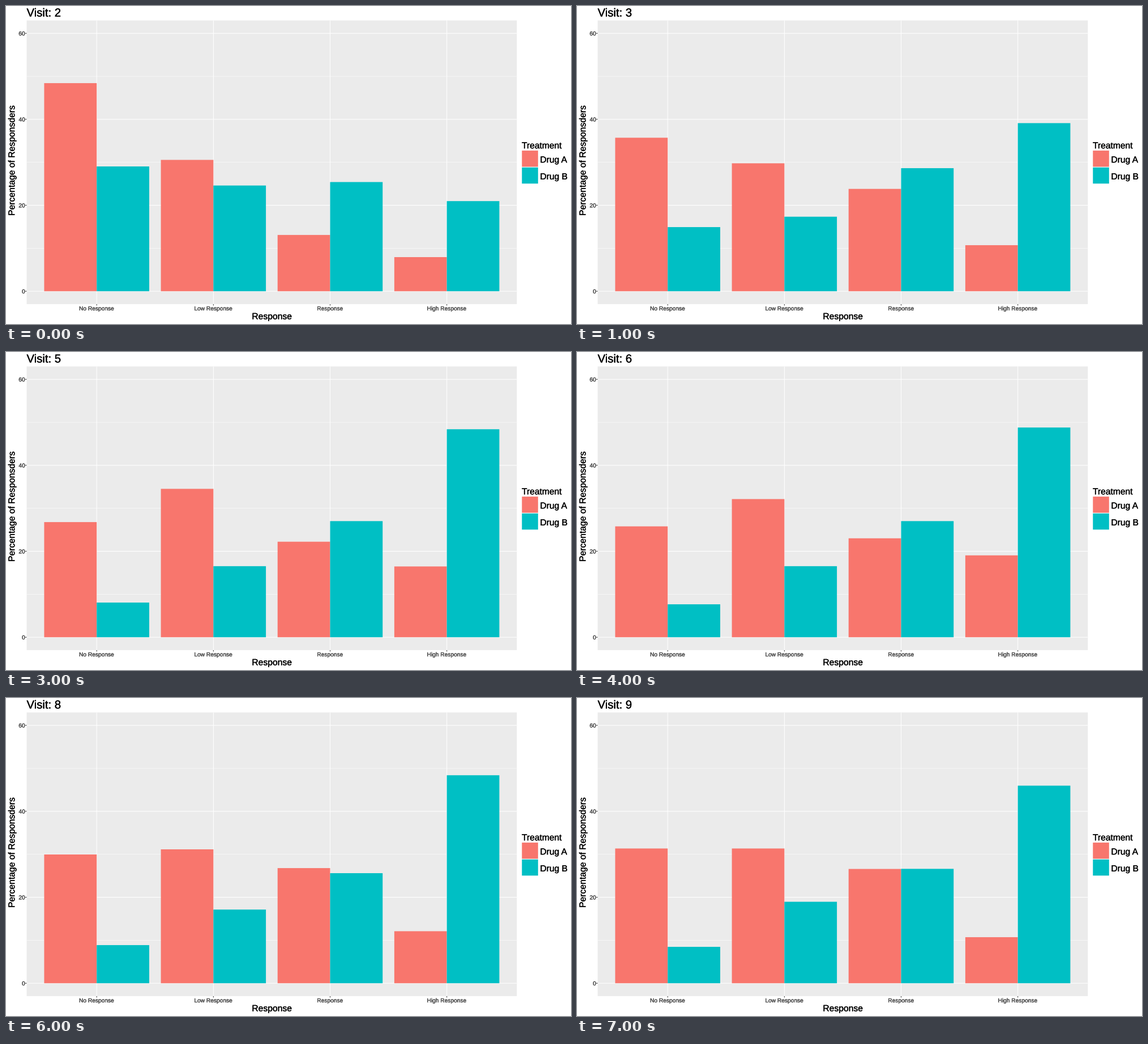
Recreate the animation shown at these times as a matplotlib script. Size 998 by 561 pixels, loop 8000 ms.

```python
import matplotlib.pyplot as plt
import numpy as np
from matplotlib.animation import FuncAnimation
from matplotlib.patches import Rectangle
from matplotlib.patheffects import withStroke

W, H, DPI = 998, 561, 64
PT = 72 / DPI  # points per pixel

# Panel geometry in pixels, y pointing down
ZERO, UNIT = 503.2, 7.583
FIRST, STEP = 160.2, 206.15
BAR = 0.45 * STEP
LEFT, RIGHT = FIRST - 0.6 * STEP, FIRST + 3.6 * STEP
TOP, BOTTOM = ZERO - 63 * UNIT, ZERO + 3 * UNIT

RED, TEAL = "#F8766D", "#00BFC4"
LEVELS = ["No Response", "Low Response", "Response", "High Response"]
VISITS = range(2, 10)

# Patients in the first three levels at key visits; visits between are
# interpolated and everyone left over is a high responder.
KEY_VISITS = [2, 3, 4, 6, 7, 9]
DRUG_A = 252, [
    [122, 90, 70, 65, 72, 79],
    [77, 75, 93, 81, 78, 79],
    [33, 60, 54, 58, 68, 67],
]
DRUG_B = 248, [
    [72, 37, 21, 19, 23, 21],
    [61, 43, 41, 41, 38, 47],
    [63, 71, 67, 67, 61, 66],
]

plt.rcParams["font.family"] = "Liberation Sans"
fig = plt.figure(figsize=(W / DPI, H / DPI), dpi=DPI, facecolor="white")
ax = fig.add_axes([0, 0, 1, 1])
ax.set_xlim(0, W)
ax.set_ylim(H, 0)
ax.axis("off")


def rect(x, y, w, h, color, z=1):
    patch = Rectangle((x, y), w, h, facecolor=color, linewidth=0,
                      snap=False, zorder=z)
    return ax.add_patch(patch)


def line(xs, ys, color, width):
    ax.plot(xs, ys, color=color, linewidth=width * PT, snap=False,
            solid_capstyle="butt", zorder=2)


def label(x, y, text, size, color="black", ha="left", rotation=0):
    weight = withStroke(linewidth=0.3 * PT, foreground=color)
    return ax.text(x, y, text, fontsize=size * PT, color=color, ha=ha,
                   va="baseline", rotation=rotation, rotation_mode="anchor",
                   path_effects=[weight])


def y_of(percent):
    return ZERO - percent * UNIT


def x_of(level):
    return FIRST + level * STEP


def percentages(drug, visit):
    total, levels = drug
    counts = [np.interp(visit, KEY_VISITS, keys) for keys in levels]
    counts.append(total - sum(counts))
    return [100 * count / total for count in counts]


# Panel, grid and axes
rect(LEFT, TOP, RIGHT - LEFT, BOTTOM - TOP, "#EBEBEB", 0)
for value in range(0, 61, 10):
    y = y_of(value)
    major = value % 20 == 0
    line([LEFT, RIGHT], [y, y], "white", 1.07 if major else 0.55)
    if major:
        line([LEFT - 2.5, LEFT], [y, y], "#333333", 1)
        label(33.8, y + 3.8, str(value), 10.2, "#4D4D4D", "right")
for i, name in enumerate(LEVELS):
    x = x_of(i)
    line([x, x], [TOP, BOTTOM], "white", 1.07)
    line([x, x], [BOTTOM, BOTTOM + 2.5], "#333333", 1)
    label(x, 537, name, 10.2, "#4D4D4D", "center")

label(469.7, 552.6, "Response", 15.7, ha="center")
label(15.2, 272.2, "Percentage of Responsders", 15.7, ha="center",
      rotation=90)
title = label(36.5, 18.5, "", 20.3)

# Legend
label(911, 251.2, "Treatment", 15.6)
for y, color, name in ((255.1, RED, "Drug A"), (284.8, TEAL, "Drug B")):
    rect(911.3, y, 28.5, 28.5, color)
    label(943.4, y + 21.1, name, 15.6)

bars_a = [rect(x_of(i) - BAR, ZERO, BAR, 0, RED, 3) for i in range(4)]
bars_b = [rect(x_of(i), ZERO, BAR, 0, TEAL, 3) for i in range(4)]


def draw(frame):
    visit = VISITS[frame]
    title.set_text(f"Visit: {visit}")
    for bars, drug in ((bars_a, DRUG_A), (bars_b, DRUG_B)):
        for bar, percent in zip(bars, percentages(drug, visit)):
            bar.set_height(-percent * UNIT)
    return [title, *bars_a, *bars_b]


anim = FuncAnimation(fig, draw, frames=len(VISITS), interval=1000,
                     repeat=True, repeat_delay=0)
plt.show()
```
